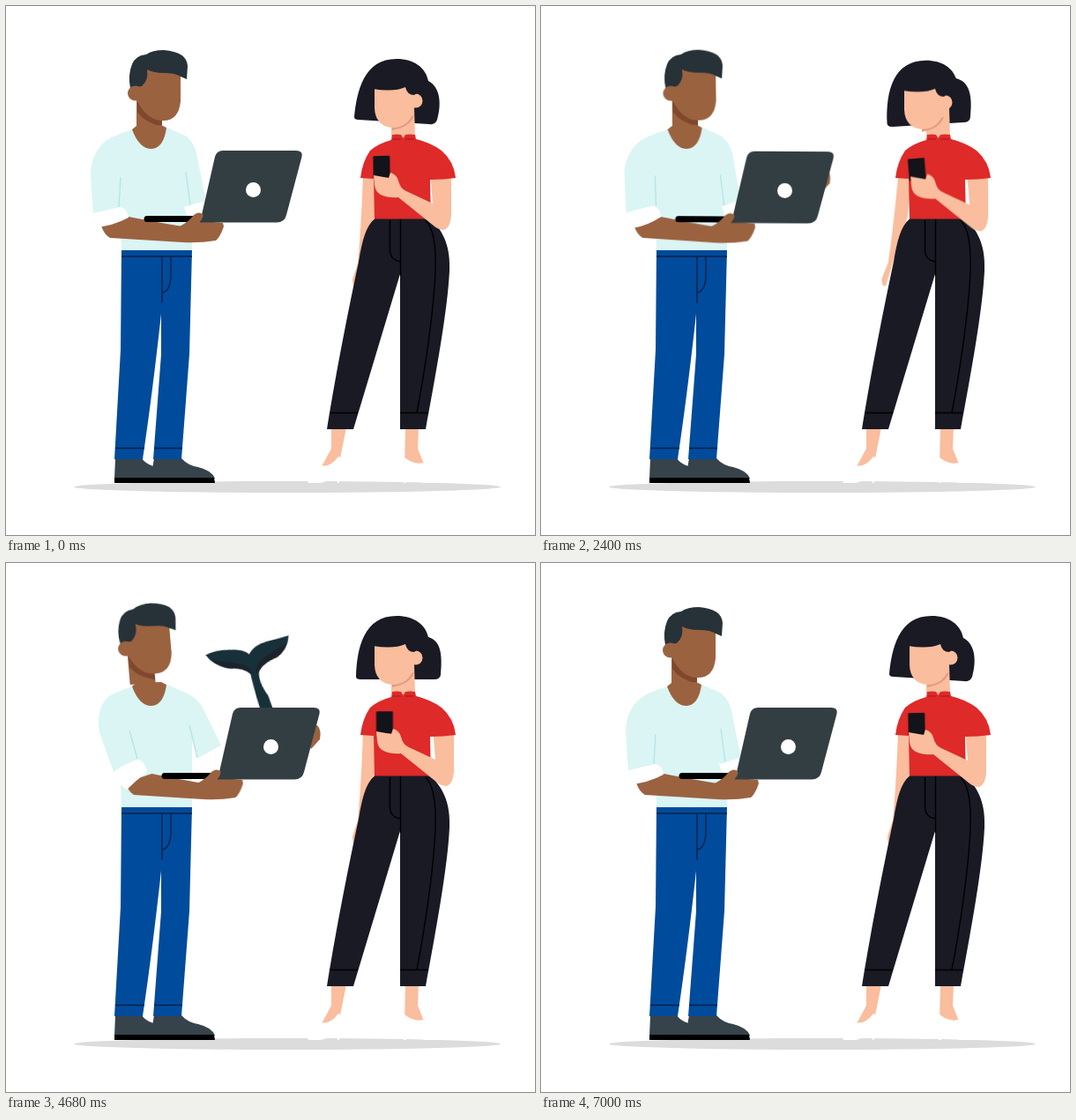
Recreate the animation shown at these times as an HTML page without scripts. Size 600 by 600 pixels, loop 7.04 s.

```html
<!DOCTYPE html>
<html lang="en">
<head>
<meta charset="utf-8">
<title>Two people with devices</title>
<style>
html, body { margin: 0; height: 100%; overflow: hidden; background: #fff; }
svg { display: block; width: 100vw; height: 100vh; }
.move { animation: 7.04s ease-in-out infinite; }
.skin { fill: #9b6240; }
.shirt { fill: #daf5f4; }
.peach { fill: #fabd9d; }
.red { fill: #de2a29; }
.dark { fill: #1a1a25; }
.white { fill: #fff; }
.line { fill: none; stroke-width: 1.4; }

.torso { animation-name: torso; transform-origin: 170px 277px; }
@keyframes torso {
  0%, 31%, 50.57%, 100% { transform: none; }
  40.34% { transform: skewX(-1.1deg); }
}
.head { animation-name: head; transform-origin: 173px 87px; }
@keyframes head {
  0%, 99.43%, 100% { transform: translate(0, 0) rotate(0deg); }
  27.27%, 31% { transform: translate(2px, 1px) rotate(0deg); }
  40.34% { transform: translate(-5.5px, -4.5px) rotate(-4deg); }
  50.57% { transform: translate(-11.5px, -5px) rotate(-6deg); }
  66.48% { transform: translate(-12px, -4px) rotate(-5deg); }
  79.55% { transform: translate(-7px, -2px) rotate(-1deg); }
}
.lap { animation-name: lap; transform-origin: 280px 208px; }
@keyframes lap {
  0%, 99.43%, 100% { transform: translate(0, 0) rotate(0deg); }
  27.27% { transform: translate(-9px, 0) rotate(0deg); }
  31% { transform: translate(-11px, 0) rotate(0deg); }
  40.34% { transform: translate(19.5px, 4px) rotate(1.5deg); }
  50.57% { transform: translate(18.5px, 0) rotate(0deg); }
  66.48% { transform: translate(20px, 0) rotate(0deg); }
  79.55%, 82% { transform: translate(21px, 0) rotate(0deg); }
}
.fingers { animation-name: fingers; }
@keyframes fingers {
  0%, 99.43%, 100% { transform: translateX(-12px); }
  27.27%, 31% { transform: translateX(-6px); }
  40.34%, 82% { transform: none; }
}
.forearm { animation-name: forearm; transform-origin: 247px 250px; }
@keyframes forearm {
  0%, 31%, 99.43%, 100% { transform: none; }
  40.34%, 82% { transform: translateX(2px) scaleX(.96); }
}
.sleeveL { animation-name: sleeveL; }
@keyframes sleeveL {
  0%, 99.43%, 100% { d: path("M136 142 L120 149 C103 157 96 176 96 192 L99 236 L137 230 L132 190Z"); }
  27.27% { d: path("M136 142 L119 149 C101 158 92 178 93 195 L91 235 L130 229 L132 190Z"); }
  31% { d: path("M136 142 L118 149 C99 158 90 178 91 195 L89 235 L128 229 L132 190Z"); }
  40.34% { d: path("M138 142 L122 150 C108 158 105 176 107 192 L122 237 L154 225 L140 190Z"); }
  50.57% { d: path("M136 142 L118 150 C106 158 102 176 104 192 L120 237 L154 225 L140 190Z"); }
  66.48%, 82% { d: path("M136 142 L119 150 C106 158 103 176 106 192 L122 237 L156 225 L140 190Z"); }
}
.foldL { animation-name: foldL; }
@keyframes foldL {
  0%, 99.43%, 100% { d: path("M130 194 L128 228"); }
  27.27%, 31% { d: path("M126 193 L125 228"); }
  40.34%, 82% { d: path("M140 190 L149 222"); }
}
.cuffL { animation-name: cuffL; }
@keyframes cuffL {
  0%, 99.43%, 100% { d: path("M99 235 Q97 242 101 251 Q120 250 139 240 Q137 229 130 228 Q112 232 99 235Z"); }
  27.27% { d: path("M91 234 Q89 241 99 250 Q115 250 131 240 Q131 228 122 228 Q105 232 91 234Z"); }
  31% { d: path("M89 234 Q87 241 97 250 Q113 250 129 240 Q129 228 120 228 Q103 232 89 234Z"); }
  40.34%, 50.57% { d: path("M120 237 Q120 247 135 257 Q145 247 159 237 Q157 226 148 223 Q135 226 120 237Z"); }
  66.48%, 82% { d: path("M122 237 Q122 247 137 257 Q147 247 160 237 Q159 226 150 223 Q137 226 122 237Z"); }
}
.sleeveR { animation-name: sleeveR; }
@keyframes sleeveR {
  0%, 99.43%, 100% { d: path("M196 144 Q214 150 217 172 L229 232 L204 238 L202 186Z"); }
  27.27%, 31% { d: path("M196 144 Q213 150 216 172 L222 232 L204 238 L202 190Z"); }
  40.34%, 82% { d: path("M196 144 Q216 150 224 166 L244 207 L217 222 L208 184Z"); }
}
.foldR { animation-name: foldR; }
@keyframes foldR {
  0%, 99.43%, 100% { d: path("M204 188 L209 226"); }
  27.27%, 31% { d: path("M202 194 L205 228"); }
  40.34%, 82% { d: path("M208 184 L217 221"); }
}
.cuffR { animation-name: cuffR; }
@keyframes cuffR {
  0%, 99.43%, 100% { d: path("M202 228 L226 221 L230 232 L226 238 L205 238Z"); }
  27.27%, 31% { d: path("M202 229 L220 224 L224 234 L215 238 L204 238Z"); }
  40.34%, 82% { d: path("M216 222 L244 207 L248 216 L233 237 L222 238Z"); }
}
.tail { animation-name: tail; transform-origin: 277px 164px; }
@keyframes tail {
  0%, 34.5%, 77%, 100% { transform: translate(0, 40px) rotate(-50deg) scale(0); }
  40.34% { transform: translate(4px, 1px) rotate(-31deg) scale(1); }
  50.57% { transform: translate(0, 0) rotate(0deg) scale(1); }
  66.48% { transform: translate(14px, -12px) rotate(-12.5deg) scale(1.1); }
  71% { transform: translate(14px, -9px) rotate(-8deg) scale(1.08); }
}
.dot { animation-name: dot; animation-timing-function: linear; }
@keyframes dot {
  0%, 38.6% { opacity: 0; transform: translateY(-8px); }
  38.61% { opacity: 1; transform: translateY(-8px); }
  40.3% { opacity: 1; transform: none; }
  40.85% { opacity: 1; transform: none; }
  40.86%, 100% { opacity: 0; transform: none; }
}
.hair { animation-name: hair; }
@keyframes hair {
  0%, 99.43%, 100% { d: path("M395 126 C398 96 406 60 443 60 C463 60 476 70 479 85 C493 92 494 112 489 129 Q487 135 480 134 L400 129 Q395 129 395 126Z"); }
  27.27%, 31% { d: path("M393 134 C391 96 400 62 437 62 C456 62 467 71 471 82 C487 86 490 102 487 127 Q486 132 479 132 L399 138 Q393 138 393 134Z"); }
  40.34% { d: path("M391 130 C391 96 400 61 435 61 C455 61 466 70 470 82 C486 87 488 104 486 128 Q485 132 479 132 L397 134 Q391 134 391 130Z"); }
  50.57% { d: path("M400 132 C399 96 408 60 443 60 C464 60 474 70 479 81 C495 86 497 100 495 122 Q494 128 487 128 L406 136 Q400 136 400 132Z"); }
  66.48%, 82% { d: path("M397 129 C398 96 406 60 443 60 C463 60 476 70 479 84 C494 88 495 106 493 127 Q492 132 486 132 L402 132 Q397 132 397 129Z"); }
}
.face { animation-name: face; }
@keyframes face {
  0%, 50.57%, 100% { transform: none; }
  27.27%, 31% { transform: translate(-6px, 2px); }
  40.34% { transform: translate(-6px, 1px); }
}
.hang { animation-name: hang; transform-origin: 411px 197px; }
@keyframes hang {
  0%, 50.57%, 100% { transform: rotate(0deg); }
  27.27% { transform: rotate(3.4deg); }
  31% { transform: rotate(3.6deg); }
  40.34% { transform: rotate(2deg); }
}
.hold { animation-name: hold; }
@keyframes hold {
  0%, 99.43%, 100% { transform: none; }
  27.27% { transform: translate(0, 2px); }
  40.34% { transform: translate(4px, 1px); }
  50.57% { transform: translate(5px, -1px); }
  66.48% { transform: translate(3px, -1px); }
  79.55% { transform: translate(1px, 0); }
}
.phone { animation-name: phone; transform-origin: 426px 182px; }
@keyframes phone {
  0%, 79.55%, 100% { transform: rotate(-1deg); }
  27.27% { transform: translate(-4px, 3px) rotate(-7deg); }
  40.34% { transform: translate(0, 0) rotate(-3deg); }
  50.57% { transform: translate(1px, -2px) rotate(1deg); }
}
</style>
</head>
<body>
<svg viewBox="0 0 600 600" aria-hidden="true">
  <ellipse cx="319" cy="545.5" rx="242" ry="6.5" fill="#dcdcdc"/>
  <circle class="move dot" cx="142.5" cy="25.5" r="2" fill="#e3202b"/>

  <g class="move tail">
    <path fill="#17303a" d="M229 109 Q240 106 254 109 Q268 111 273 118 Q279 110 293 109 Q306 109 317 108 Q313 122 301 127 Q284 130 279 138 Q276 148 283 164 L286 188 H273 L271 164 Q270 146 270 138 Q264 130 250 128 Q234 121 229 109Z"/>
    <path fill="#1c232b" d="M234 116 Q252 121 266 128 Q272 132 272 139 L270 138 Q264 130 250 128 Q240 124 234 116ZM314 115 Q298 120 284 126 Q277 130 276 140 L279 138 Q284 130 301 127 Q309 123 314 115Z"/>
  </g>

  <!-- man, legs -->
  <g fill="#36434a">
    <path d="M124 513 H154 Q158 519 167 522 L171 536 H123Z"/>
    <path d="M168 513 H199 Q206 521 218 523 Q234 527 237 536 H164Z"/>
  </g>
  <path d="M123 535 H236 L237 541 H123Z"/>
  <path fill="#004b9b" d="M131 276 H211 L208 395 L199 514 H167 L176 395 V349 Q166 440 155 514 H123 L130 390Z"/>
  <path class="line" stroke="#0b2148" d="M131 284 H211 M177 284 V337 M187 284 V304 Q187 322 178 325 M124 501.500 H157 M168 501.500 H200"/>

  <!-- man, body -->
  <g class="move head">
    <path class="skin" d="M148 95 H177 V142 L148 140Z"/>
    <path fill="#7f482d" d="M149 106 Q154 122 177 128 V137 Q157 132 149 120Z"/>
    <path class="skin" d="M148 95 L158 68 L198 78 V108 Q196 130 178 130 Q160 130 149 108Z"/>
    <path fill="#263238" d="M141 93 Q138 78 143 66 Q147 56 159 55 Q166 50 179 50 Q205 52 206 68 L205 83 L198 80 Q192 76 180 76 Q167 76 160 72 Q162 84 154 91Z"/>
    <circle class="skin" cx="146.500" cy="99" r="8.500"/>
  </g>
  <path class="move sleeveL shirt"/>
  <path class="move sleeveR shirt"/>
  <g class="move torso">
    <path class="shirt" d="M143 140 L118 150 L128 200 L131 277 H211 V160 L205 148 L183 138Z"/>
    <path class="skin" d="M148 136 L143 140 Q151 162 165 162 Q179 161 182 138 L176 135Z"/>
  </g>
  <g class="line" stroke="#b3e7e6">
    <path class="move foldL"/>
    <path class="move foldR"/>
  </g>
  <path class="move cuffR white"/>
  <g class="move lap">
    <path class="move fingers skin" d="M318 188 L333 184 Q338 189 336 200 L326 211Z"/>
    <path class="move forearm skin" d="M108 249 L139 239 Q175 246 200 250 L212 243 L246 246 L247 250 Q243 262 238 266 Q220 269 200 268 L118 263 Q111 259 108 249Z"/>
    <rect x="156.500" y="238" width="70" height="7" rx="3.500"/>
    <path fill="#333e42" d="M246 164 H329 Q337 164 335.500 171 L318 237 Q316 245.500 307 245.500 H220 L237 171 Q239 164 246 164Z"/>
    <circle class="white" cx="280.500" cy="208.500" r="8.500"/>
    <path class="skin" d="M197 250 Q208 244 212 238 Q218 232 223 236 Q225 239 219 246 L222 256 H200Z"/>
  </g>
  <path class="move cuffL white"/>

  <!-- woman, legs -->
  <path class="move hang peach" d="M405 190 H420 L418 240 L405 290 L398 318 Q393 321 393 310 L399 292 Q403 250 405 190Z"/>
  <path class="peach" d="M369 478 H386 L379 513 L373 524 L356 526 L369 502ZM453 478 H468 L467 502 L475 522 L452 520Z"/>
  <path class="white" d="M357 521 Q367 524 377 511 Q380 511 380 520 L378 541 H376 L373 527 Q366 541 355 541 H343 Q340 538 357 521ZM450 510 Q461 521 473 518 L487 538 Q488 541 484 541 H474 Q462 538 457 527 L454 541 H451 L448 520 Q448 511 450 510Z"/>

  <!-- woman, body -->
  <path class="move hair dark"/>
  <path class="peach" d="M437 115 H463 L464 148 L450 151 L437 148Z"/>
  <g class="move face">
    <path fill="#e59a86" d="M438 134 L463 124 Q459 137 438 141Z"/>
    <path class="peach" d="M418 90 L455 86 L463 100 V118 Q457 138 438 138 Q419 136 418 116Z"/>
    <circle class="peach" cx="464.500" cy="107.500" r="8"/>
    <path class="dark" d="M416 94 Q440 98 453 92 Q455 101 463 101 Q468 96 473 100 L473 84 L420 80Z"/>
  </g>
  <path class="red" d="M438 146 Q444 145 448 146 L450.500 150 L453 146 Q458 145 464 146 L465 151 Q480 155 490 162 L481 197 L482 243 H418 L417 196 L402 195 Q404 177 413 164 Q422 156 437 152Z"/>
  <path class="line" stroke="#b81f22" stroke-width="1" d="M439 151 H448 M453 151 H463"/>
  <path class="dark" d="M418 241.500 H482 C498 258 504 275 503 300 C501 345 487 420 476 480 H447 V304 L394 480 H364 C372 430 385 360 400 290 C404 266 408 250 418 241.500Z"/>
  <path class="line" stroke="#000" d="M367 461.500 H399 M447 461.500 H479 M447.500 242 V306 M435.500 243 V278 Q436 288 447 290 M476 243 C485 252 488 270 487 300 C485 350 474 420 466 461"/>
  <g class="move hold">
    <rect class="move phone dark" x="416.500" y="170" width="19" height="25" rx="1" style="fill:#13131a"/>
    <path class="peach" d="M481 188 H505 V238 Q504 251 497 254 Q491 254 486 250 L445 217 Q434 218 425 214 Q419 211 418 203 L417 192 L434 195 L436 189 Q443 191 445 198 Q447 207 454 210 L484 224Z"/>
  </g>
  <path class="red" d="M464 151 Q482 155 494 164 Q508 176 510 195 Q496 197 481 197 L470 180Z"/>
</svg>
</body>
</html>
```
